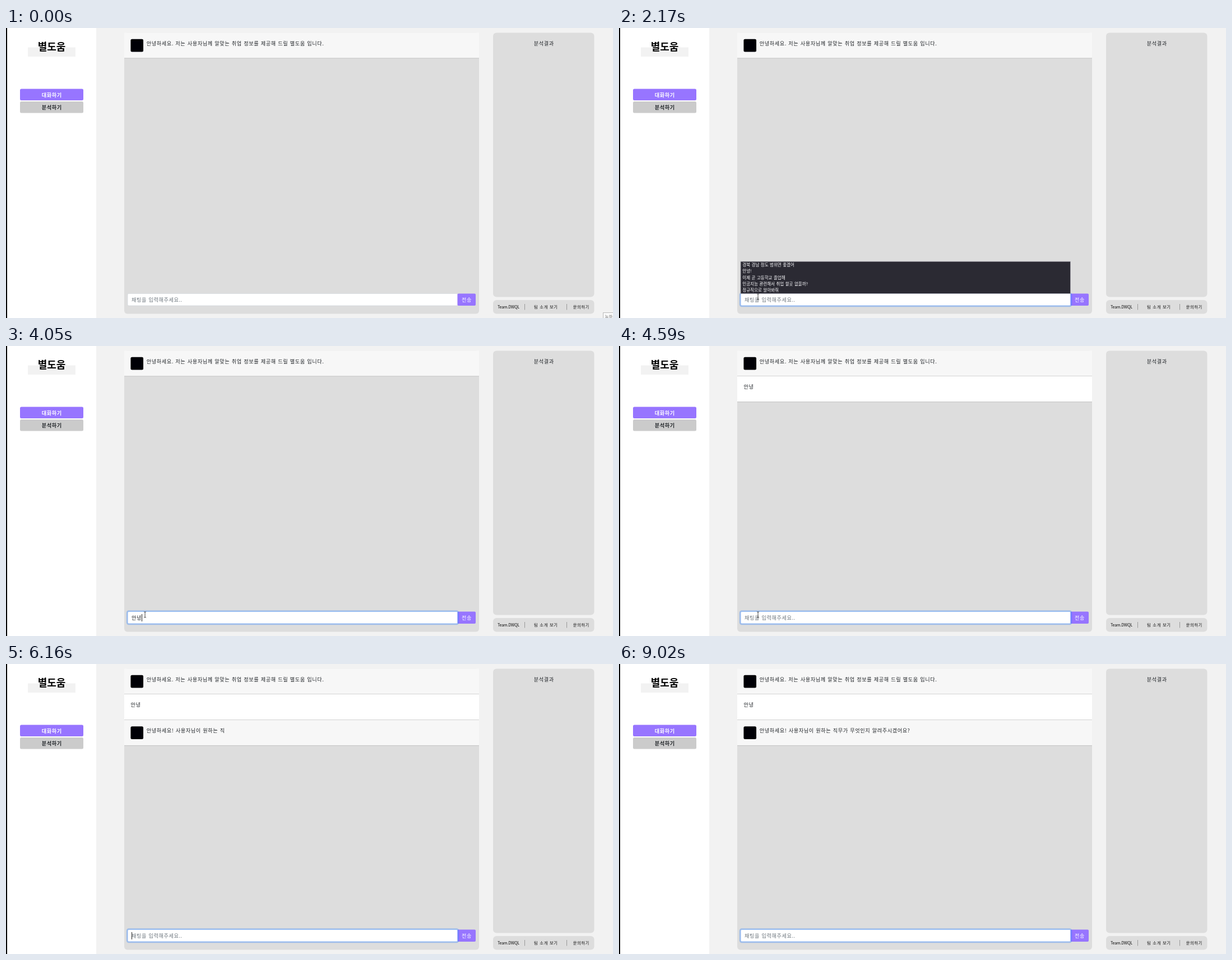
Write an HTML page that moves like this. It is 1083 px wide and 517 px high and loops after 9.18 s.

```html
<!DOCTYPE html>
<html lang="ko">
<head>
<meta charset="utf-8">
<title>취업 상담 채팅</title>
<style>
  html, body { margin: 0; height: 100%; overflow: hidden; background: #f2f2f2; }
  svg { display: block; width: 100%; height: 100%; }
  text {
    font: 9.15px "Noto Sans CJK KR", "Noto Sans CJK", "Noto Sans CJK JP", sans-serif;
    letter-spacing: .6px; word-spacing: .35px; fill: #212529; white-space: pre;
  }
  .mid { text-anchor: middle; }
  .bold { font-weight: 700; }
  .title { font-size: 18px; font-weight: 700; letter-spacing: 0; fill: #000; }
  .foot { font-size: 7.3px; fill: #111; }
  .list text { font-size: 7.5px; letter-spacing: 0; fill: #fbfbfe; }
  .white { fill: #fff; }
  .hint { fill: #6c757d; }
</style>
</head>
<body>
<svg viewBox="0 0 1083 517" preserveAspectRatio="none">
  <rect width="161" height="517" fill="#fff"/>
  <rect width="2" height="517"/>

  <!-- sidebar -->
  <rect x="39" y="34.5" width="85" height="16.5" fill="#f2f2f2"/>
  <text class="mid title" x="81.5" y="40.2">별도움</text>
  <rect x="25" y="108.5" width="113" height="20.5" rx="2.5" fill="#9775ff"/>
  <text class="mid bold white" x="81.8" y="122.6">대화하기</text>
  <rect x="25" y="131" width="113" height="20.5" rx="2.5" fill="#cbcbcb"/>
  <text class="mid bold" x="81.8" y="145.2">분석하기</text>

  <!-- chat -->
  <rect x="211" y="8.5" width="633" height="501" rx="5.5" fill="#ddd"/>
  <g id="rows"></g>
  <rect x="217" y="473.5" width="589" height="21.5" rx="2" fill="#fff" stroke="#ced4da" stroke-width=".6"/>
  <rect x="805.5" y="473.5" width="32.5" height="21.5" rx="2" fill="#9775ff"/>
  <text class="mid white" x="822" y="488.3">전송</text>
  <g id="ring" fill="none">
    <rect x="215.9" y="472.4" width="591.2" height="23.7" rx="3" stroke="#0d6efd" stroke-opacity=".27" stroke-width="2.3"/>
    <rect x="217" y="473.5" width="589" height="21.5" rx="2" stroke="#86b7fe" stroke-width=".7"/>
  </g>
  <text id="entry" x="224" y="488.3"></text>
  <rect id="caret" y="478" width="1" height="13" fill="#222"/>
  <g id="list" class="list">
    <rect x="217" y="416.2" width="588.5" height="57.3" fill="#2b2a33" stroke="#a9a9b0" stroke-width=".8"/>
  </g>

  <!-- results -->
  <rect x="869" y="8.5" width="180.5" height="471" rx="6" fill="#ddd"/>
  <text class="mid" x="959.8" y="30.5">분석결과</text>
  <rect x="869" y="485" width="180.5" height="24.5" rx="6" fill="#ddd"/>
  <text class="mid foot" x="896.5" y="500.2" style="letter-spacing:-.25px">Team.DWQL</text>
  <text class="mid foot" x="963.3" y="500.2">팀 소개 보기</text>
  <text class="mid foot" x="1026.3" y="500.2">문의하기</text>
  <path d="M925.5 492V502.500M1000.500 492V502.500" stroke="#999"/>

  <g id="tip">
    <rect x="1065.500" y="507.500" width="30" height="20" fill="#fafafa" stroke="#bbb"/>
    <text x="1068.500" y="518.300" style="font-size:7.500px;letter-spacing:0;fill:#777">녹화</text>
  </g>

  <circle id="glow" r="6" fill="#fff34d" opacity=".75"/>
  <g id="mouse">
    <path id="beam" d="M-2-5.200Q0-5.200 0-4Q0-5.200 2-5.200M0-4V4M-2 5.200Q0 5.200 0 4Q0 5.200 2 5.200" fill="none" stroke="#333" stroke-width=".9"/>
    <path id="arrow" d="M0 0V9.500L2.200 7.500L3.700 10.600L5 10L3.600 7H6.500Z" fill="#fff" stroke="#000" stroke-width=".6"/>
  </g>
</svg>
<script>
const LOOP = 9180, BLINK = 520;
const HINT = "채팅을 입력해주세요..";
const REPLY = "안녕하세요! 사용자님이 원하는 직무가 무엇인지 알려주시겠어요?";
const $ = id => document.getElementById(id);
const show = (el, on) => el.setAttribute("visibility", on ? "visible" : "hidden");
const clamp = v => Math.max(0, Math.min(1, v));
const ramp = (t, a, b) => clamp((t - a) / (b - a));

function add(parent, tag, attrs, text = "") {
  const el = document.createElementNS("http://www.w3.org/2000/svg", tag);
  for (const k in attrs) el.setAttribute(k, attrs[k]);
  el.textContent = text;
  return parent.appendChild(el);
}

function row(i, text, bot) {
  const y = 8.3 + i * 45.75, g = add($("rows"), "g", {});
  add(g, "rect", { x: 211, y, width: 633, height: 45.75, fill: bot ? "#f7f7f7" : "#fff" });
  add(g, "rect", { x: 211, y: y + 45.1, width: 633, height: 1, fill: "#c2c2c2" });
  if (bot) add(g, "rect", { x: 222.4, y: y + 11.5, width: 22.6, height: 22.6, rx: 2.5, fill: "#000006" });
  add(g, "text", { x: bot ? 250.7 : 222.4, y: y + 22.3 }, text);
  return g;
}

row(0, "안녕하세요. 저는 사용자님께 알맞는 취업 정보를 제공해 드릴 별도움 입니다.", true);
const sent = row(1, "안녕", false);
const answer = row(2, "", true);
const answerText = answer.querySelector("text");

["경북 경남 정도 범위면 좋겠어", "안녕!", "이제 곧 고등학교 졸업해",
 "인공지능 관련해서 취업 할곳 없을까?", "정규직으로 알아봐줘"]
  .forEach((s, i) => add($("list"), "text", { x: 220.3, y: 425.2 + i * 11.25 }, s));

// Keyframes are [time, ...values]
const typed = [[0, HINT], [2420, "ㅇ"], [2980, "아"], [3080, "안"], [3180, "안ㄴ"],
  [3280, "안녀"], [3440, "안녕"], [4100, HINT]];
const letters = [[4950, 5], [5470, 10], [5820, 14], [5970, 16], [6160, 18],
  [6380, 20], [6780, 25], [7360, 30], [7800, 34]];
const path = [[990, 175.5, 497], [1090, 200, 489], [1200, 231, 480], [1300, 245, 478],
  [1900, 245, 478], [2170, 248, 479], [5150, 248, 479], [5470, 252, 520]];

function lerp(keys, t) {
  const i = keys.findIndex(k => k[0] > t);
  if (i < 0) return keys[keys.length - 1].slice(1);
  if (i === 0) return keys[0].slice(1);
  const a = keys[i - 1], b = keys[i], p = ramp(t, a[0], b[0]);
  return a.slice(1).map((v, j) => v + (b[j + 1] - v) * p);
}

function caretX(t) {
  if (t < 1640) return null;
  if (t < 2420) return t < 2130 ? 224 : null;
  if (t < 4050) return null;
  if (t < 4100) return 242;
  return Math.floor((t - 4070) / BLINK) % 2 ? null : 224;
}

function draw(t) {
  const entry = typed.filter(k => k[0] <= t).pop()[1];
  $("entry").textContent = entry;
  $("entry").setAttribute("class", entry === HINT ? "hint" : "");

  const cx = caretX(t);
  show($("caret"), cx !== null);
  $("caret").setAttribute("x", cx || 0);

  $("ring").setAttribute("opacity", ramp(t, 1650, 1750));
  show($("list"), t >= 1700 && t < 2420);
  show(sent, t >= 4100);
  show(answer, t >= 4950);
  answerText.textContent = REPLY.slice(0, Math.floor(lerp(letters, t)[0] + 1e-6));

  const [x, y] = lerp(path, t);
  const live = t >= 990 && t < 5470, inside = x > 217 && y < 495;
  $("mouse").setAttribute("transform", `translate(${x} ${y})`);
  show($("beam"), live && inside);
  show($("arrow"), live && !inside);
  $("glow").setAttribute("cx", x - 1.5);
  $("glow").setAttribute("cy", y);
  show($("glow"), t >= 1600 && t < 1900);

  const tip = t < 4000 ? 1 - ramp(t, 40, 90) : ramp(t, 8160, 8360) - ramp(t, 8820, 9020);
  $("tip").setAttribute("opacity", tip);
}

const start = performance.now();
function tick() {
  draw((performance.now() - start) % LOOP);
  requestAnimationFrame(tick);
}
tick();
</script>
</body>
</html>
```
